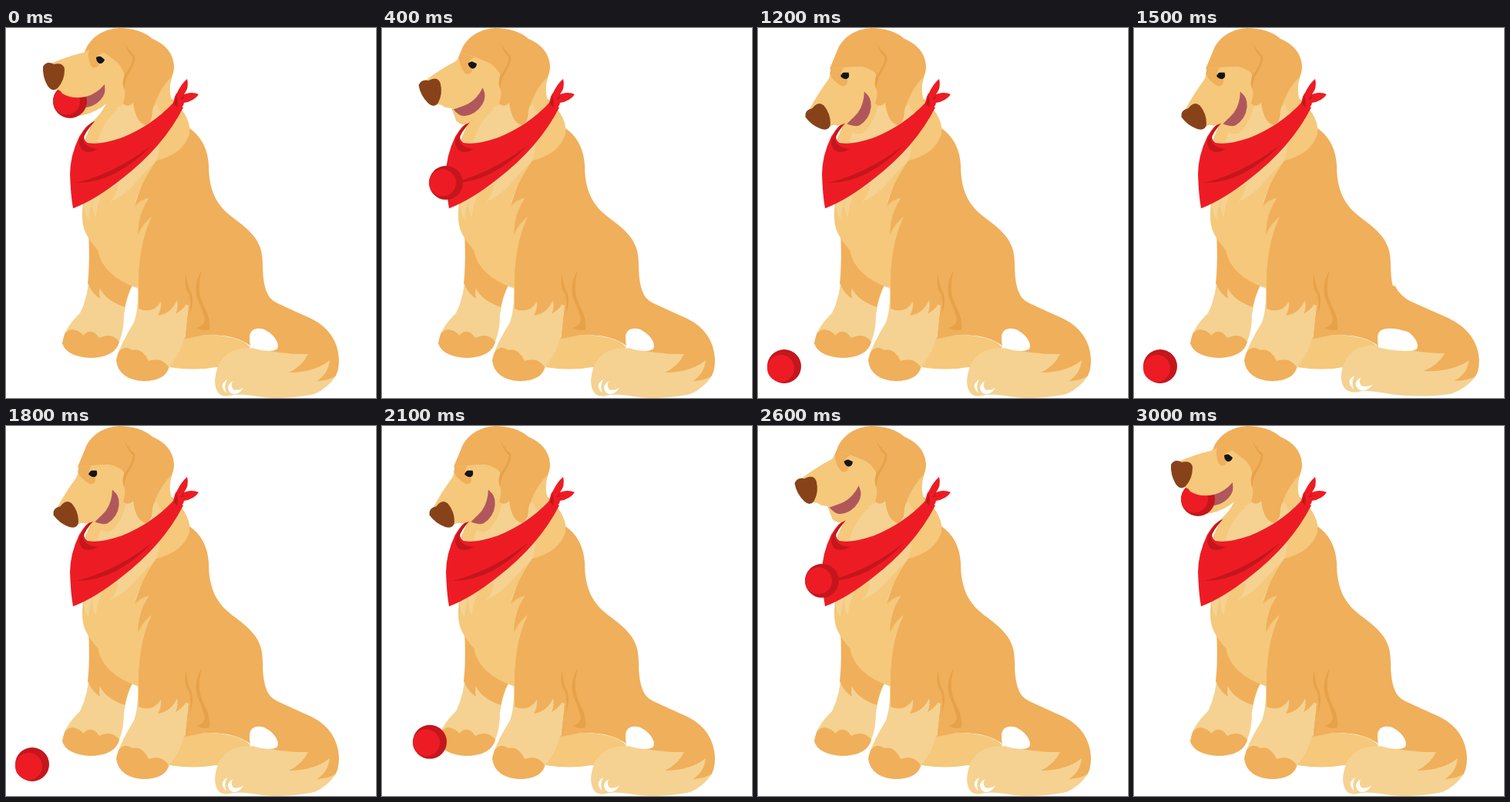
These frames come from a looping animation (480 by 480 pixels, 3.1 s). An HTML page:

```html
<!DOCTYPE html>
<html>
<head>
<meta charset="utf-8">
<style>
html, body { margin: 0; width: 100%; height: 100%; overflow: hidden; background: #fff; }
svg { display: block; width: 100vw; height: 100vh; }
.coat { fill: #f0af5a; }
.mid { fill: #f5c87b; }
.light { fill: #f5d291; }
.shade { fill: #e7a149; }
.red { fill: #ed1c24; }
.dark { fill: #c4161c; }
.gap { fill: #fff; }
</style>
</head>
<body>
<svg viewBox="0 0 480 480">
  <path class="mid" d="M228 402Q260 394 294 402Q310 406 317 414L300 440H272Q244 445 212 440Z"/>
  <path class="coat" d="M215 92Q235 110 238 130Q261 146 263 178C263 235 295 243 313 261C330 277 333 290 333 308Q333 338 343 351L370 380L317 398Q315 406 318 413Q298 397 258 398L232 403L236 365L172 370V300L167 230L180 190Z"/>
  <g id="tail">
    <path class="coat" d="M320 335L334 338Q340 351 352 357Q380 370 396 377Q430 394 432 430Q432 448 425 455L395 476L320 450Z"/>
    <path class="light" d="M290 421Q306 413 325 416Q365 424 392 423Q384 439 367 447Q400 447 420 431Q418 449 403 458Q418 458 428 451Q418 467 400 475Q365 482 333 479Q306 474 294 476Q272 483 271 458Q273 431 290 421Z"/>
    <path class="gap" d="M287 456Q275 463 286 474Q282 464 287 456ZM294 458Q283 466 292 474Q300 478 308 467Q299 471 295 469Q291 465 294 458Z"/>
  </g>
  <path id="hole" class="gap"/>

  <path class="light" d="M108 318Q107 348 96 370Q75 390 73 409Q80 427 110 428Q142 426 147 407Q153 392 153 372Q156 352 163 335Z"/>
  <path class="coat" d="M107 265Q109 305 106 331Q112 345 122 351Q120 343 122 338Q130 354 154 362Q157 346 164 334L150 290Z"/>
  <path class="coat" d="M76 397Q83 388 93 393Q99 396 100 399Q111 387 121 402Q137 394 147 407Q142 427 110 428Q78 426 73 409Z"/>
  <path class="light" d="M171 335Q172 365 166 382Q149 409 143 429Q147 457 180 458Q207 457 212 440Q229 418 233 395L237 360Z"/>
  <path class="coat" d="M172 300V364Q190 372 201 355Q202 364 197 373Q214 371 222 353Q224 362 220 371Q234 363 238 349L230 280Z"/>
  <path class="coat" d="M146 421Q153 410 164 418Q176 414 185 432Q202 426 211 440Q207 457 180 458Q147 457 143 432Z"/>
  <path class="shade" d="M234 317Q229 333 238 346Q241 358 238 373Q244 357 241 346Q234 333 234 317ZM254 314Q243 333 248 350Q257 370 258 380Q254 388 247 389Q257 394 264 391Q266 378 257 361Q246 342 254 314Z"/>

  <path class="mid" d="M101 220Q96 250 103 265Q108 276 119 288Q125 322 172 338Q171 283 189 245Q178 253 171 268Q172 239 186 220Q176 222 167 231Q173 204 195 172Q229 164 238 138Q240 119 225 104L150 160Z"/>
  <path class="light" d="M101 220Q99 235 107 249Q108 238 112 224Q112 240 117 246Q117 230 126 213L145 203Q145 213 135 226Q158 215 172 196Q186 182 195 172Q201 156 198 145Z"/>

  <path class="light" d="M131 96Q126 109 113 121L102 145L112 153Q150 150 185 130L218 100L190 60Z"/>
  <path class="mid" d="M131 96Q126 109 113 121L103 143Q105 149 118 150Q125 122 145 105Z"/>
  <path class="mid" d="M190 50L216 62Q209 82 217 98L204 111Q199 108 196 99L180 110Z"/>

  <path class="red" d="M115 121Q105 124 95 141Q83 166 83 190Q84 218 87 234Q116 223 151 195Q204 154 230 103L217 97Q190 126 151 142Q123 152 106 149Q98 144 103 135Z"/>
  <path class="dark" d="M115 121Q104 125 95 146Q95 160 106 161Q113 161 119 157Q101 155 100 144Q102 136 115 121ZM91 201Q145 187 190 151Q170 173 143 188Q117 201 91 201Z"/>
  <path class="red" d="M217 98Q219 86 222 84Q227 73 235 66Q238 77 231 86Q241 82 250 86Q244 95 231 97Q230 103 224 105Z"/>
  <path class="dark" d="M217 98Q221 92 220 86Q224 92 222 103ZM231 86L226 93L243 87L230 92Z"/>

  <path class="mid" d="M112 50L168 40V98H153Q140 109 130 98Z"/>
  <path class="coat" d="M147 0Q118 2 105 24L100 36L93 53L112 66L153 80L168 40V8Z"/>
  <g class="head">
    <path class="mid" d="M82 89L84 107Q90 116 100 113Q118 109 130 98Q141 106 151 94L128 70Z"/>
    <path fill="#b0575c" d="M84 91Q108 91 128 72Q131 85 122 94Q111 105 95 103Q88 100 84 91Z"/>
  </g>
  <g id="ball">
    <circle class="dark" r="22"/>
    <circle id="shine" class="red" r="17.5"/>
  </g>
  <g class="head">
    <path class="mid" d="M113 23Q107 30 100 32Q79 37 58 46L62 80Q70 79 73 85Q86 93 104 89Q118 85 128 73L130 96Q139 106 151 94L154 62Q151 52 146 46Q133 35 121 28Z"/>
    <path class="coat" d="M113 23L108 27Q105 37 110 49Q116 55 121 47Q115 43 119 36Q123 33 127 32Z"/>
    <path fill="#151515" d="M117 38Q121 36 123 37L128 41Q126 47 121 46Q117 44 117 38Z"/>
    <path fill="#87421a" d="M48 50Q53 42 62 47Q75 44 76 54Q76 68 67 78Q60 84 54 75Q47 63 48 50Z"/>
  </g>
  <path class="coat" d="M146 0Q174 0 190 14Q216 25 218 49Q218 58 215 63Q201 77 194 95Q191 101 190 107Q190 122 182 126Q168 123 165 97Q158 104 152 98Q157 84 152 74Q155 55 153 32Q154 14 146 0Z"/>
  <path class="shade" d="M154 20Q158 32 165 38Q163 51 154 61Q150 69 153 79Q155 64 161 56Q169 43 167 36Q159 29 154 20Z"/>
</svg>
<script>
const LOOP = 3100, STEP = 100, TURN = 1500;
const $ = id => document.getElementById(id);
const heads = document.querySelectorAll('.head');
const clamp = v => Math.max(0, Math.min(1, v));
const mix = (a, b, k) => a + (b - a) * k;
const move = (el, value) => el.setAttribute('transform', value);

function draw(now) {
  const t = Math.floor(now % LOOP / STEP) * STEP;
  const u = TURN - Math.abs(t - TURN); // the second half plays backwards
  const fall = clamp(u / 700) ** 1.82;
  const roll = clamp((u - 675) / 525);
  const wag = clamp((u - 1200) / 300);

  heads.forEach(head => move(head, `rotate(${-39.5 * fall} 146 64)`));
  move($('ball'), `translate(${mix(83, 34, roll)} ${mix(mix(95, 388, fall), 439, roll)})`);
  move($('shine'), `translate(-4.5 ${2.5 * roll})`);
  move($('tail'), `translate(430 0) skewY(${2 * wag}) translate(${-430 - 33 * wag} 0) scale(${1 + 0.113 * wag} 1)`);

  const x = 15 * wag;
  $('hole').setAttribute('d', `M316 403C315 388 331 387 ${340 + x} 394
    C${351 + x} 401 ${356 + x} 413 ${351 + x} 417C${344 + x} 421 328 418 317 414Z`);
  requestAnimationFrame(draw);
}
requestAnimationFrame(draw);
</script>
</body>
</html>
```
